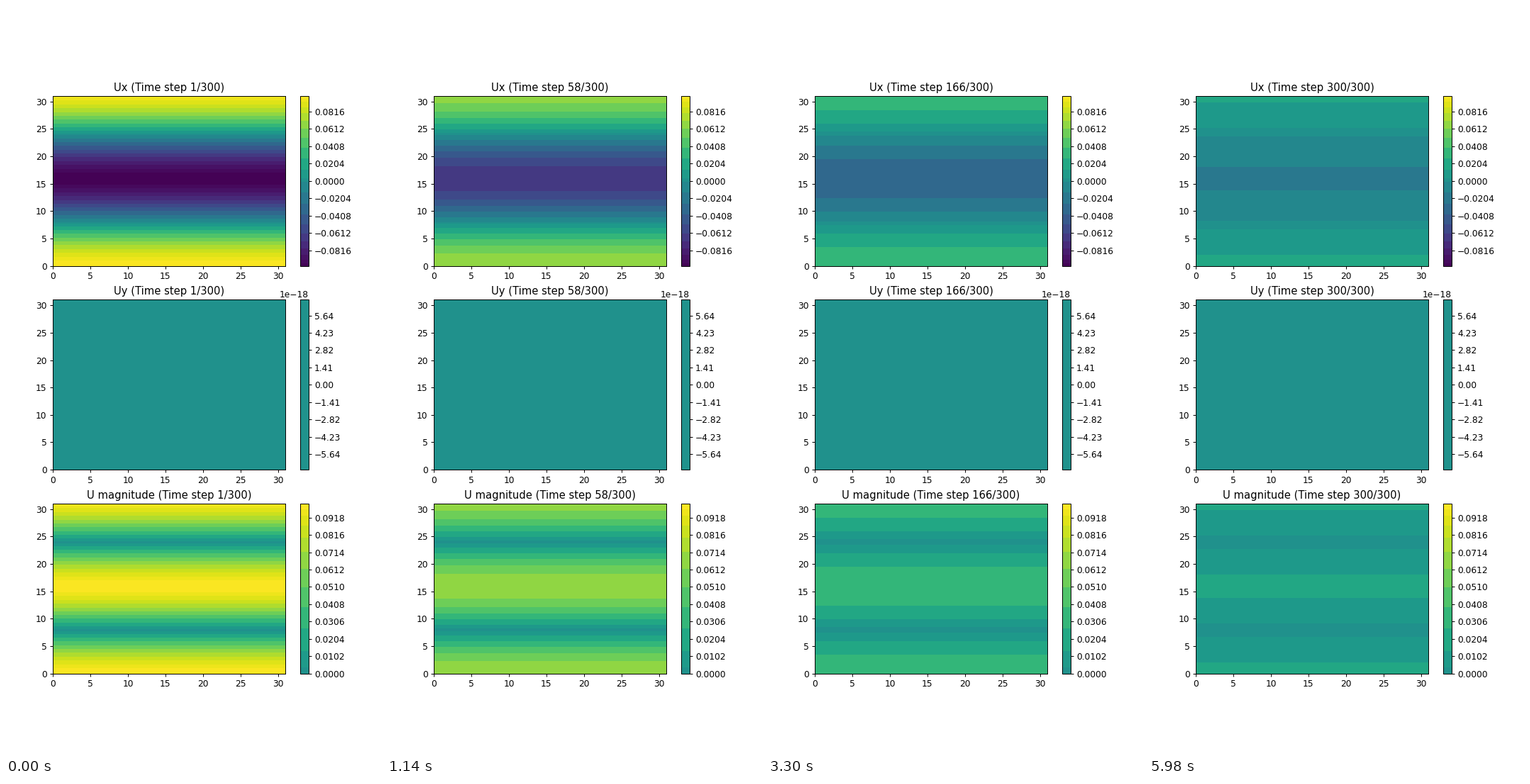
Write a matplotlib script that moves like this. It is 529 px wide and 1058 px high and loops after 6000 ms.

```python
import numpy as np
import matplotlib.pyplot as plt
from matplotlib.animation import FuncAnimation
from matplotlib.cm import ScalarMappable
from matplotlib.colors import ListedColormap, Normalize

STEPS = 300
N = 32
U0 = 0.1
NU = 1 / 6
UY_MAX = 6.91e-18

# Fill colours change at these velocities: bands narrow towards the extremes,
# and a thin resting band lies around zero.
half = U0 * np.sin(0.133 * np.arange(1, 11))
EDGES = np.concatenate([-half[::-1], [-0.001, 0.0035], half])
BOUNDS = np.concatenate([[-U0], EDGES, [U0]])
MIDS = (BOUNDS[:-1] + BOUNDS[1:]) / 2
COLORS = plt.get_cmap("viridis")((MIDS + U0) / (2 * U0))[:, :3]

ROWS = 480
grid = np.arange(N)
fine = (np.arange(ROWS) + 0.5) / ROWS * (N - 1)


def shade(u):
    return COLORS[np.digitize(u, EDGES)]


def column(profile):
    """Banded colours of a profile given on the grid, as a one-pixel-wide image."""
    return shade(np.interp(fine, grid, profile))[:, None, :]


def velocity(step):
    k = 2 * np.pi / N
    return U0 * np.exp(-NU * k * k * step) * np.cos(k * grid)


def make_panel(ax, lo, hi, ticks):
    img = ax.imshow(column(np.zeros(N)), origin="lower", aspect="auto",
                    extent=(0, N - 1, 0, N - 1), interpolation="nearest")
    ax.set_xticks(range(0, N, 5))
    ax.set_yticks(range(0, N, 5))
    cmap = ListedColormap(shade(np.linspace(lo, hi, 256)))
    fig.colorbar(ScalarMappable(Normalize(lo, hi), cmap), ax=ax, ticks=ticks)
    return img


fig, axes = plt.subplots(3, 1, figsize=(6, 12), dpi=529 / 6)
signed = np.arange(-4, 5)
images = [
    make_panel(axes[0], -U0, U0, 0.0204 * signed),
    make_panel(axes[1], -UY_MAX, UY_MAX, 1.41e-18 * signed),
    make_panel(axes[2], 0, U0, 0.0102 * np.arange(10)),
]
names = ["Ux", "Uy", "U magnitude"]
titles = [ax.set_title(name) for ax, name in zip(axes, names)]


def update(i):
    step = i + 1
    u = velocity(step)
    images[0].set_data(column(u))
    images[2].set_data(column(np.abs(u)))
    for title, name in zip(titles, names):
        title.set_text(f"{name} (Time step {step}/{STEPS})")
    return images + titles


anim = FuncAnimation(fig, update, frames=STEPS, interval=20,
                     repeat=True, repeat_delay=0)
plt.show()
```
